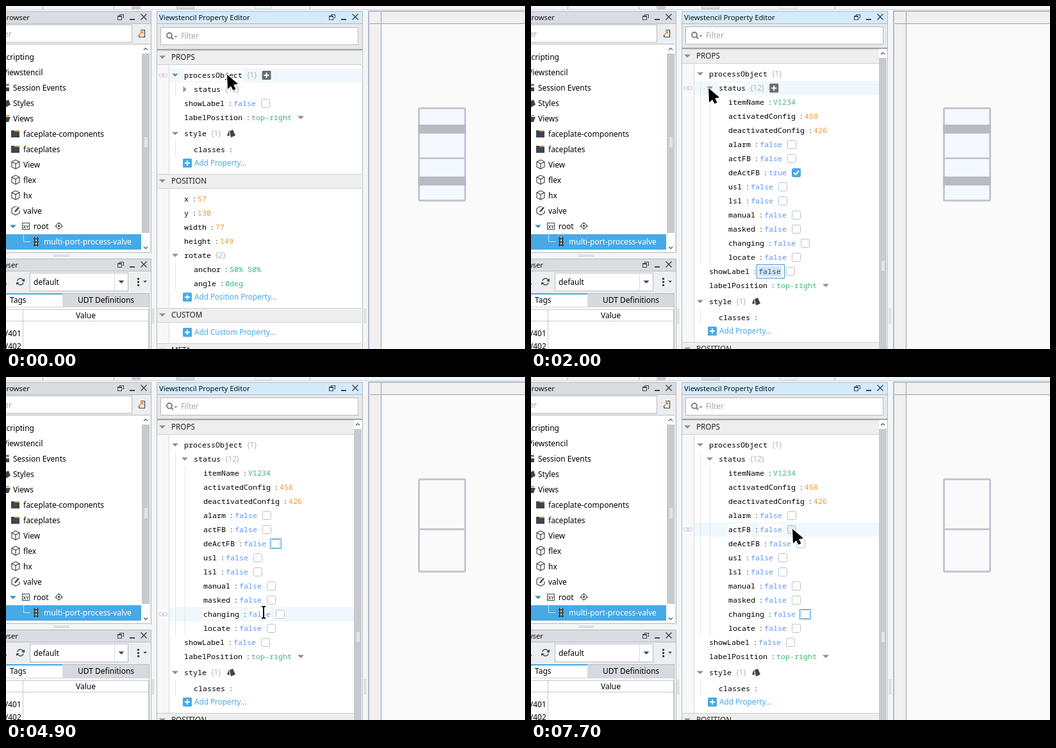
Recreate the animation shown at these times as an HTML page with a canvas. Size 810 by 535 pixels, loop 8 s.

```html
<!DOCTYPE html>
<html lang="en">
<head>
<meta charset="utf-8">
<title>Property editor</title>
<style>
html, body { margin: 0; width: 100%; height: 100%; overflow: hidden; background: #f4f5f6; }
canvas { display: block; }
</style>
</head>
<body>
<canvas id="stage" width="810" height="535"></canvas>
<script>
const g = document.getElementById('stage').getContext('2d');
const LOOP = 8000;
const SANS = '"Noto Sans", "Open Sans", sans-serif';
const UI = '12px ' + SANS, TITLE = '11.25px ' + SANS, WEB = '11.7px ' + SANS;
const MONO = '11.67px "Noto Sans Mono", "DejaVu Sans Mono", monospace';
const CH = 7;
const BLUE = '#47a9e6', DARK = '#3d464e', INK = '#000', GREY = '#b4b4b4', EDGE = '#b4bbc1';
const BOOL = '#5c97f5', NUM = '#f2972b', STR = '#3cb878';

// ---- drawing helpers ----
function box(x, y, w, h, c) { g.fillStyle = c; g.fillRect(x, y, w, h); }
function frame(x, y, w, h, fill, edge) {
  box(x, y, w, h, edge);
  box(x + 1, y + 1, w - 2, h - 2, fill);
}
function text(s, x, y, c = INK, font = UI, align = 'left') {
  g.font = font; g.fillStyle = c; g.textAlign = align;
  g.fillText(s, x, y + (font == UI ? 5 : 4));
}
function trace(pts, closed) {
  g.beginPath();
  pts.forEach(([x, y], i) => i ? g.lineTo(x, y) : g.moveTo(x, y));
  if (closed) g.closePath();
}
function line(pts, c, w = 1) { trace(pts); g.strokeStyle = c; g.lineWidth = w; g.stroke(); }
function poly(pts, c) { trace(pts, true); g.fillStyle = c; g.fill(); }
function round(x, y, w, h, r, fill, edge, lw = 1) {
  g.beginPath(); g.roundRect(x, y, w, h, r);
  if (fill) { g.fillStyle = fill; g.fill(); }
  if (edge) { g.strokeStyle = edge; g.lineWidth = lw; g.stroke(); }
}
function ring(x, y, r, c, w = 1, a = 0, b = 7) {
  g.beginPath(); g.arc(x, y, r, a, b);
  g.strokeStyle = c; g.lineWidth = w; g.stroke();
}
function down(x, y, c = '#8f8f8f', r = 5) { poly([[x - r, y - r / 2], [x + r, y - r / 2], [x, y + r / 2]], c); }
function right(x, y) { poly([[x - 2.5, y - 5], [x + 3, y], [x - 2.5, y + 5]], '#999'); }
function chevron(x, y, d) { line([[x - 3, y - 1.5 * d], [x, y + 1.5 * d], [x + 3, y - 1.5 * d]], '#555', 1.2); }
function plus(x, y, c) {
  round(x - 7, y - 7, 14, 14, 1.5, c);
  box(x - 4, y - 1, 8, 2, '#fff');
  box(x - 1, y - 4, 2, 8, '#fff');
}
function grip(x, y, w, h) {
  for (let i = 0; i < w; i += 2) for (let j = 0; j < h; j += 2) box(x + i, y + j, 1, 1, '#9ca3a9');
}
function ridges(x, y) {
  for (let i = 0; i < 16; i += 2) box(x, y + i, 5, 1, '#fff');
}

// ---- static surroundings ----
function titleBar(x, y, w, c, label, lx, align) {
  frame(x, y, w, 20, c, EDGE);
  text(label, lx, y + 10, '#111', TITLE, align);
  const r = x + w;
  g.strokeStyle = DARK; g.lineWidth = 1;
  g.strokeRect(r - 49.5, y + 5.5, 6, 5);
  box(r - 53, y + 7, 8, 7, c);
  g.strokeRect(r - 52.5, y + 7.5, 6, 6);
  box(r - 53, y + 7, 7, 2, DARK);
  box(r - 34, y + 12, 8, 2, DARK);
  line([[r - 16.5, y + 4.5], [r - 7.5, y + 13.5]], DARK, 1.4);
  line([[r - 7.5, y + 4.5], [r - 16.5, y + 13.5]], DARK, 1.4);
}
function folder(y) {
  poly([[8, y - 5], [13, y - 5], [14, y - 3], [21, y - 3], [21, y + 6], [8, y + 6]], DARK);
  box(14, y - 5, 7, 2, '#f0892e');
}
function cube(y) {
  const x = 15;
  line([[x, y - 7], [x + 6, y - 4], [x + 6, y + 4], [x, y + 7], [x - 6, y + 4], [x - 6, y - 4],
    [x, y - 7]], DARK, 1.2);
  line([[x - 6, y - 4], [x, y - 1], [x + 6, y - 4]], DARK, 1.2);
  line([[x, y - 1], [x, y + 7]], DARK, 1.2);
}
function tree() {
  box(0, 356, 211, 24, BLUE);
  const rows = [['Scripting', -6], ['Viewstencil', -5], ['Session Events', 11], ['Styles', 11],
    ['Views', 11], ['faceplate-components', 27], ['faceplates', 27], ['View', 27], ['flex', 27],
    ['hx', 27], ['valve', 27], ['root', 43], ['multi-port-process-valve', 59]];
  rows.forEach(([s, x], i) => text(s, x, 79 + 24 * i, i == 12 ? '#fff' : INK));
  folder(199); folder(223);
  cube(247); cube(271); cube(295);
  // sidebar glyphs
  box(0, 122, 4, 2, DARK); box(0, 127, 5, 6, DARK); box(3, 121, 2, 4, '#f0892e');
  poly([[0, 148], [4, 146], [7, 154], [0, 158]], DARK);
  box(0, 170, 5, 2, '#f0892e'); poly([[0, 173], [7, 173], [4, 181], [0, 181]], DARK);
  line([[17, 313], [13, 313], [9, 316], [9, 323], [15, 326], [21, 323], [21, 319]], DARK, 1.2);
  line([[14, 321], [20, 314]], DARK, 2.6);
  down(11, 344, '#3f8fbd');
  frame(25, 338, 12, 11, '#fff', DARK);
  text('XY', 31, 342.5, DARK, 'bold 7px ' + SANS, 'center');
  ring(82.5, 343, 4, DARK, 1.2); ring(82.5, 343, 1, DARK, 1.5);
  box(82, 337, 1, 3, DARK); box(82, 346, 1, 3, DARK); box(76, 343, 3, 1, DARK); box(86, 343, 3, 1, DARK);
  line([[27.5, 356], [27.5, 367.5], [38, 367.5]], '#cfe6f6');
  box(44, 360, 6, 15, DARK);
  box(46, 360, 2, 15, '#c8d4dc');
  for (const y of [362, 367, 372]) box(43, y, 8, 2, DARK);
}
function leftSide() {
  titleBar(-40, 8, 267, '#d9dde1', 'Browser', 37, 'right');
  box(0, 28, 227, 358, '#eceef0');
  frame(-5, 29, 202, 28, '#fff', EDGE);
  text('Filter', 9, 43, '#a5a5a5', UI, 'right');
  line([[210, 37.5], [216.5, 37.5], [216.5, 48.5], [208, 48.5], [208, 45]], DARK, 1.2);
  line([[206, 47], [213, 40]], '#f0892e', 1.6);
  poly([[209, 39], [214, 39], [214, 44]], '#f0892e');
  frame(-2, 59, 226, 326, '#fff', EDGE);
  tree();
  box(212, 60, 12, 324, '#fff');
  box(212, 74, 12, 280, '#c7cbcf');
  chevron(218, 67, -1); chevron(218, 377, 1);
  ridges(216, 205);
  box(226, 8, 1, 378, EDGE);
  box(0, 386, 227, 9, '#f4f5f6'); grip(75, 388, 24, 4);

  titleBar(-40, 394, 267, '#d9dde1', 'Browser', 19, 'right');
  box(0, 414, 227, 34, '#eceef0');
  ring(22.5, 430, 5, DARK, 1.4, 3.4, 5.9); ring(22.5, 430, 5, DARK, 1.4, 0.3, 2.8);
  poly([[29, 425], [29, 430], [24, 429]], DARK);
  poly([[16, 431], [21, 431], [16, 435]], DARK);
  box(0, 433, 1, 2, DARK);
  frame(37, 416, 154, 29, '#fff', EDGE);
  box(169, 417, 1, 27, '#d5d9dc');
  text('default', 43, 430);
  down(180, 430.5, DARK, 4.5);
  for (const y of [424, 429, 434]) box(205, y, 3, 3, DARK);
  down(217, 430, DARK, 3);
  frame(-2, 448, 226, 100, '#fff', EDGE);
  box(88, 449, 135, 20, '#d6dade');
  box(0, 448, 88, 2, BLUE);
  text('Tags', 6, 458);
  text('UDT Definitions', 112, 458);
  box(0, 469, 223, 1, '#d0d4d8');
  box(0, 473, 223, 1, '#c4c9cd'); box(0, 491, 223, 1, '#c4c9cd');
  box(26, 473, 1, 62, '#c4c9cd'); box(222, 473, 1, 62, '#c4c9cd');
  text('Value', 124.5, 482, INK, UI, 'center');
  text('V401', -4, 510); text('V402', -4, 530);
  box(226, 394, 1, 141, EDGE);
}
function surroundings() {
  box(0, 0, 810, 535, '#f4f5f6');
  box(0, 5, 810, 1, '#d5d8db');
  box(57, 0, 1, 5, EDGE); box(168, 0, 1, 5, EDGE); box(474, 0, 1, 5, EDGE);
  box(196, 0, 14, 5, '#c9ced3');
  frame(266, -2, 28, 7, '#d9dee2', EDGE);
  frame(388, -2, 27, 7, '#eaf4fb', '#cfd8df');
  leftSide();
  grip(228, 472, 4, 24); grip(559, 472, 4, 24);
  // design area
  box(565, 7, 245, 528, '#aeb9cb');
  box(567, 9, 243, 526, '#f0f0f0');
  box(585, 27, 225, 508, '#9b9fa3');
  box(586, 28, 224, 507, '#fafafa');
  box(568, 27, 17, 1, '#9b9fa3'); box(585, 9, 1, 18, '#9b9fa3');
}

// ---- property editor ----
const ITEMS = [['itemName', 'V1234', STR], ['activatedConfig', '458', NUM], ['deactivatedConfig', '426', NUM],
  ['alarm'], ['actFB'], ['deActFB'], ['usl'], ['lsl'], ['manual'], ['masked'], ['changing'], ['locate']];

function chain(y) {
  round(238.5, y - 2.5, 7, 5, 2.5, null, '#d4d4d4', 1.2);
  round(244.5, y - 2.5, 7, 5, 2.5, null, '#d4d4d4', 1.2);
  box(242, y - 0.5, 6, 1, '#d4d4d4');
}
function check(x, y, s, on, focus) {
  const hot = s.x >= x - 4 && s.x <= x + 14 && Math.abs(s.y - y) < 8;
  if (focus) g.strokeStyle = '#3d9bd8', g.lineWidth = 1, g.strokeRect(x - 1.5, y - 7.5, 17, 15);
  round(x + 0.5, y - 6.5, 13, 13, 2, on ? (hot ? '#2379b5' : BLUE) : hot ? '#e9ebed' : '#fff',
    on ? (hot ? '#2379b5' : BLUE) : '#bcc1c5');
  if (on) line([[x + 3, y], [x + 6, y + 3], [x + 11, y - 3]], '#fff', 2);
}
function hovered(y, s) { return Math.abs(s.y - y) < 11; }
function strip(y, s, edge) {
  if (!hovered(y, s)) return;
  box(255, y - 11, edge - 255, 22, '#eff8fd');
  chain(y);
}
// Editable text sits on white when its row is hovered.
function field(str, x, y, c, s) {
  if (hovered(y, s)) box(x - 1, y - 9, str.length * CH + 2, 18, '#fff');
  text(str, x, y, c, MONO);
}
function prop(name, val, color, x, y, s, edge) {
  strip(y, s, edge);
  const end = x + name.length * CH;
  field(name, x, y, INK, s);
  text(':', end + 5.5, y, '#333', MONO);
  if (val) field(val, end + 14, y, color, s);
  return end + 14 + (val ? val.length * CH : 0);
}
function flag(name, on, x, y, s, edge, focus) {
  const end = prop(name, on ? 'true' : 'false', BOOL, x, y, s, edge);
  check(end + 8, y, s, on, focus);
}
function group(name, n, x, y, s, edge, open = true) {
  strip(y, s, edge);
  open ? down(x - 14, y) : right(x - 14, y);
  const end = x + name.length * CH;
  field(name, x, y, INK, s);
  text(`{${n}}`, end + 7, y, GREY, WEB);
  if (hovered(y, s)) plus(end + 22 + g.measureText(`{${n}}`).width, y, '#6a6e72');
}
function adder(label, y) {
  plus(283, y, BLUE);
  text(label, 294, y, BLUE, WEB);
}
function header(label, y, edge) {
  box(236, y - 11, edge - 236, 23, '#cfcfcf');
  box(236, y - 10, edge - 236, 21, '#eee');
  down(244, y);
  text(label, 258, y, '#222', WEB);
}
function guide(x, a, b) { box(x, a, 1, b - a, '#e4e4e4'); }

function editor(s) {
  const edge = s.open ? 543 : 555;
  g.save();
  g.beginPath(); g.rect(235, 28, 322, 507); g.clip();
  box(235, 28, 322, 507, EDGE);
  box(236, 28, 320, 507, '#fff');
  box(236, 28, 320, 41, '#e6e8ea');
  const f = 47 - Math.ceil(s.scroll / 2);
  frame(241, f - 14, 309, 28, '#fff', EDGE);
  ring(255, f - 1, 4, '#777', 1.8); line([[258, f + 2], [261, f + 5]], '#777', 2);
  down(265, f + 1, '#777', 2.5);
  text('Filter', 273, f, '#a5a5a5', WEB);

  g.translate(0, -s.scroll);
  box(236, 67, 320, 2, '#9ea5ab');
  box(236, 69, 319, 480, '#fff');
  box(236, 69, 18, 480, '#f8f8f8');
  box(254, 69, 1, 480, '#ddd');
  const m = { ...s, y: s.y + s.scroll };
  header('PROPS', 80, edge);
  let y = 130;
  group('processObject', 1, 278, 108, m, edge);
  group('status', 12, 293, y, m, edge, s.open);
  if (s.open) {
    for (const [name, val, color] of ITEMS) {
      y += 22;
      if (val) prop(name, val, color, 308, y, m, edge);
      else flag(name, name == 'deActFB' ? s.deact : name == 'changing' && s.changing,
        308, y, m, edge, name == s.focus);
    }
    guide(279, 141, y + 11);
  }
  guide(264, 119, y + 11);
  y += 22;
  flag('showLabel', false, 278, y, m, edge);
  if (s.edit) {
    frame(352, y - 11, 44, 22, '#fff', '#3f93cc');
    box(355, y - 8, 36, 16, '#cfe5f5');
    text('false', 355, y, '#34506a', MONO);
    if (s.caret) box(390, y - 8, 1, 16, '#111');
  }
  y += 22;
  down(prop('labelPosition', 'top-right', STR, 278, y, m, edge) + 14, y);
  y += 25;
  group('style', 1, 278, y, m, edge);
  poly([[345, y + 3], [348, y - 5], [349, y + 4]], DARK);
  poly([[349, y - 4], [354, y - 6], [358, y + 3], [351, y + 6]], DARK);
  guide(264, y + 11, y + 36);
  y += 25;
  prop('classes', '', INK, 293, y, m, edge);
  adder('Add Property...', y += 21);
  header('POSITION', y += 28, edge);
  if (!s.open) {
    y += 6;
    for (const [name, val] of [['x', 57], ['y', 130], ['width', 77], ['height', 149]])
      prop(name, String(val), NUM, 278, y += 22, m, edge);
    group('rotate', 2, 278, y += 22, m, edge);
    guide(264, y + 11, y + 55);
    prop('anchor', '50% 50%', STR, 293, y += 22, m, edge);
    prop('angle', '0deg', STR, 293, y += 22, m, edge);
    adder('Add Position Property...', y += 21);
    header('CUSTOM', y += 28, edge);
    adder('Add Custom Property...', y += 27);
    header('META', y + 28, edge);
  } else {
    box(543, 69, 12, 480, '#fff');
    box(543, 83, 12, 470, '#c7cbcf');
    chevron(549, 76, -1);
    ridges(547, 398 + s.scroll);
  }
  g.restore();
}

function valve(s) {
  const fill = s.changing ? '#fff712' : s.deact ? '#f4f8ff' : '#fafafa';
  round(644.5, 159.5, 72, 144, 2, fill, '#c3c7cf', 3);
  box(645, 236, 71, 3, '#c3c7cf');
  if (s.deact) for (const y of [185, 266]) box(643, y, 75, 14, '#b8bbc3');
}

// ---- pointer ----
const PATH = [[200, 345, 107], [800, 277, 132], [900, 277, 128], [2100, 277, 128], [2400, 345, 230],
  [2800, 345, 230], [2900, 409, 258], [3000, 409, 258], [3100, 411, 260], [4200, 411, 260],
  [4900, 402, 367], [5100, 416, 371], [5200, 421, 368], [7000, 421, 368], [7700, 408, 237]];

function pointerAt(t) {
  const i = PATH.findIndex(p => p[0] > t);
  if (i < 0) return PATH[PATH.length - 1].slice(1);
  if (i == 0) return PATH[0].slice(1);
  const [a, x, y] = PATH[i - 1], [b, u, v] = PATH[i], k = (t - a) / (b - a);
  return [Math.round(x + (u - x) * k), Math.round(y + (v - y) * k)];
}
function pointer(s) {
  g.save();
  g.translate(s.x, s.y);
  g.lineJoin = 'round';
  if (s.beam) {
    for (const [c, w] of [['#fff', 3.5], ['#000', 1.8]]) {
      line([[-3, -9], [-1, -9], [0, -8], [0, 8], [-1, 9], [-3, 9]], c, w);
      line([[3, -9], [1, -9], [0, -8], [0, 8], [1, 9], [3, 9]], c, w);
    }
  } else {
    const shape = [[0, 0], [17, 14.5], [10, 16], [13.5, 22.5], [9.5, 24.5], [6, 18], [1, 22.5]];
    trace(shape, true);
    g.strokeStyle = '#fff'; g.lineWidth = 2; g.stroke();
    g.fillStyle = '#000'; g.fill();
  }
  g.restore();
}

// ---- state at a time ----
function stateAt(ms) {
  const t = Math.floor(ms / 100) * 100, within = (a, b) => t >= a && t < b;
  const [x, y] = pointerAt(t);
  return {
    x, y,
    open: t >= 1100,
    edit: within(1200, 3700),
    caret: within(1200, 1900) || within(2400, 2900) || within(3500, 3700),
    scroll: t >= 2000 ? 2 : t >= 1900 ? 1 : 0,
    deact: t < 3700,
    changing: within(5500, 7000),
    focus: within(3700, 5500) ? 'deActFB' : t >= 5500 ? 'changing' : '',
    beam: within(3800, 4300) || (within(4300, 5200) && y > 358)
  };
}

function draw(now) {
  const s = stateAt(now % LOOP);
  surroundings();
  editor(s);
  titleBar(235, 8, 322, '#d3ebfb', 'Viewstencil Property Editor', 239);
  valve(s);
  pointer(s);
  requestAnimationFrame(draw);
}
requestAnimationFrame(draw);
</script>
</body>
</html>
```
